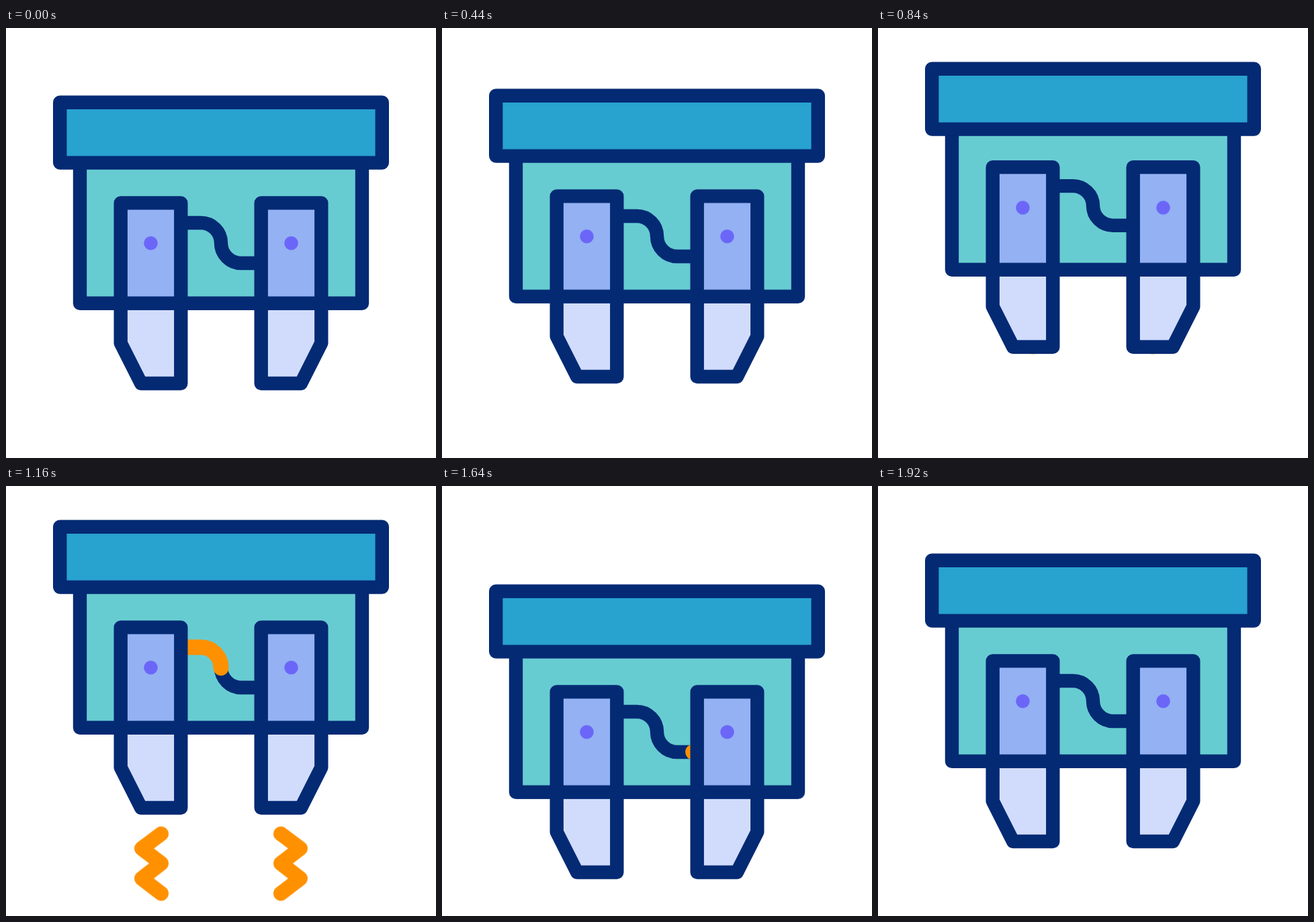
An HTML page that plays this animation: 640 px wide and 640 px high, repeating every 2000 ms.

```html
<!DOCTYPE html>
<html lang="en">
<head>
<meta charset="utf-8">
<title>Blade fuse</title>
<style>
  html, body { margin: 0; width: 100%; height: 100%; overflow: hidden; background: #fff; }
  svg { display: block; width: 100vw; height: 100vh; }

  .line, .bolt, .wire, .current { fill: none; stroke-linecap: round; stroke-linejoin: round; }
  .line, .wire { stroke: #042a74; stroke-width: 20.4px; }
  .bolt { stroke: #ff9100; stroke-width: 22px; }
  .current { stroke: #ff9100; stroke-width: 23px; }
  .dot { fill: #6b66f8; }

  .fuse, .blade, .dot, .wire, .current, .bolts {
    animation: 2s cubic-bezier(.333, 0, .667, 1) infinite;
  }
  .fuse { animation-name: hop; }
  .blade {
    d: path("M170.7 260.4 H260.3 V529 H201 L170.7 469 Z");
    animation-name: recoil;
  }
  .dot { animation-name: dot-recoil; }
  .wire, .current { d: path("M260 290 H290 A30 30 0 0 1 320 320 A30 30 0 0 0 350 350 H380"); }
  .wire { animation-name: bend; }
  .current { stroke-dasharray: 0 200; animation-name: flow; }
  .bolts { animation-name: drop; animation-timing-function: linear; }

  @keyframes hop {
    0%, 6% { transform: translateY(0); }
    16% { transform: translateY(30.8px); }
    28%, 68% { transform: translateY(-50px); }
    84% { transform: translateY(50px); }
    96%, 100% { transform: translateY(0); }
  }
  @keyframes recoil {
    0%, 24%, 45%, 100% { d: path("M170.7 260.4 H260.3 V529 H201 L170.7 469 Z"); }
    30%, 31.5% { d: path("M170.7 233.9 H260.3 V494 H201 L170.7 434 Z"); }
  }
  @keyframes dot-recoil {
    0%, 24%, 45%, 100% { transform: translateY(0); }
    30%, 31.5% { transform: translateY(-23px); }
  }
  @keyframes bend {
    0%, 24%, 45%, 100% { d: path("M260 290 H290 A30 30 0 0 1 320 320 A30 30 0 0 0 350 350 H380"); }
    30%, 31.5% { d: path("M260 250.6 H290 A30 24.7 0 0 1 320 275.3 A30 24.7 0 0 0 350 300 H380"); }
  }
  @keyframes flow {
    0%, 49.9% { visibility: hidden; }
    50% { visibility: visible; stroke-dasharray: 0 200; }
    66% { stroke-dasharray: 100 200; }
    68% { stroke-dashoffset: 0; }
    83.9% { visibility: visible; }
    84%, 100% { visibility: hidden; stroke-dasharray: 100 200; stroke-dashoffset: -100; }
    0%, 50% { stroke-dashoffset: 0; }
  }
  @keyframes drop {
    0%, 41% { transform: translateY(-140.25px); visibility: hidden; }
    41.1% { visibility: visible; }
    77.9% { visibility: visible; }
    78%, 100% { transform: translateY(165px); visibility: hidden; }
  }
</style>
</head>
<body>
<svg viewBox="0 0 640 640">
  <defs>
    <clipPath id="inside"><rect y="150" width="640" height="259.7"/></clipPath>
  </defs>

  <g class="bolts">
    <path class="bolt" d="M231 517.3 L202 539 L231 561.3 L202 583.7 L231 606"/>
    <path class="bolt" d="M409 517.3 L438 539 L409 561.3 L438 583.7 L409 606"/>
  </g>

  <g class="fuse">
    <path fill="#67ccd1" d="M110 200.5 H530 V409.7 H110 Z"/>
    <path class="wire"/>
    <path class="current" pathLength="100"/>

    <g>
      <path class="blade" fill="#d1dcfc"/>
      <g clip-path="url(#inside)"><path class="blade" fill="#93b1f3"/></g>
      <path class="blade line"/>
      <circle class="dot" cx="215.5" cy="320.2" r="10.3"/>
    </g>
    <g transform="matrix(-1 0 0 1 640 0)">
      <path class="blade" fill="#d1dcfc"/>
      <g clip-path="url(#inside)"><path class="blade" fill="#93b1f3"/></g>
      <path class="blade line"/>
      <circle class="dot" cx="215.5" cy="320.2" r="10.3"/>
    </g>

    <path class="line" d="M110 200.5 V409.7 H530 V200.5"/>
    <path class="line" style="fill: #28a2ce" d="M80.2 110.8 H559.8 V200.6 H80.2 Z"/>
  </g>
</svg>
</body>
</html>
```
